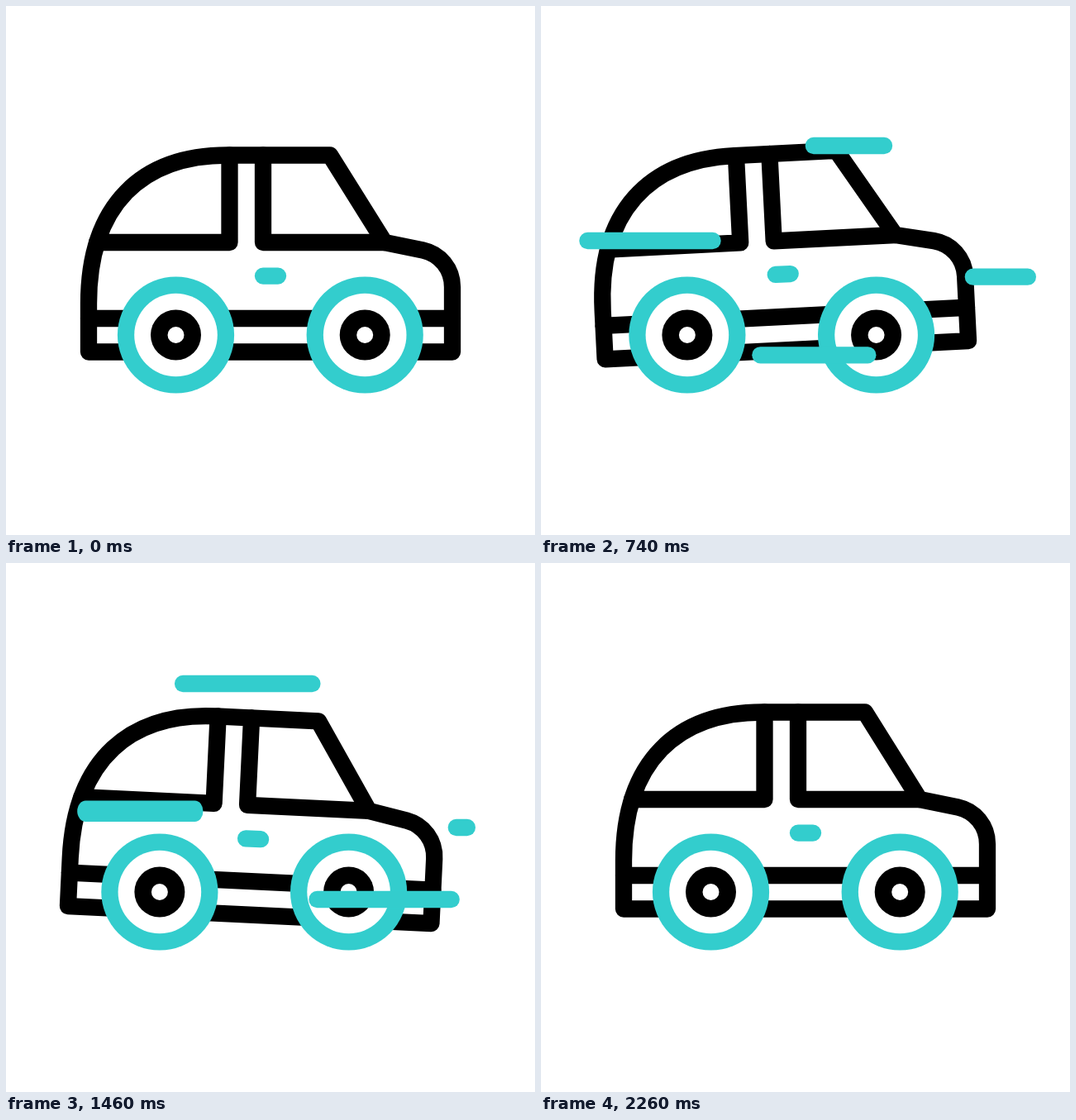
Recreate the animation shown at these times as an HTML page with a canvas. Size 640 by 640 pixels, loop 2420 ms.

```html
<!DOCTYPE html>
<html lang="en">
<head>
<meta charset="utf-8">
<title>Driving car</title>
<style>
  html, body { margin: 0; width: 100%; height: 100%; overflow: hidden; background: #fff; }
  canvas { display: block; width: 640px; height: 640px; }
</style>
</head>
<body>
<canvas id="stage" width="640" height="640"></canvas>
<script>
const ctx = document.getElementById('stage').getContext('2d');
const LOOP = 2420, STEP = 20, STROKE = 20.3;
const BLACK = '#000', TEAL = '#33cdcd', WHITE = '#fff';
const PIVOT = { x: 320, y: 300 };

// Keyframes as [ms, value], eased between neighbours
const SHIFT = [[0, 0], [585, -44.6], [1100, 32.5], [1640, -37], [2215, 0]];
const LIFT = [[0, 0], [480, 12.5], [950, -12.5], [1400, 8], [1850, -10], [2215, 0]];
const TILT = [[0, 0], [640, -3.05], [1580, 2.98], [2215, 0]];

// Speed lines: the head runs left, the tail follows after a delay
const LINE_LENGTH = 200, LINE_TIME = 444, TAIL_DELAY = 268;
const LINES = [
  { right: 540, y: 169, start: 229 },
  { right: 263.5, y: 284, start: 331 },
  { right: 405.5, y: 422.3, start: 475 },
  { right: 599, y: 327.7, start: 567 },
  { right: 571, y: 407, start: 1096 },
  { right: 386.5, y: 146, start: 1143 },
  { right: 238.5, y: 300.2, start: 1192, thick: 1.25 },
  { right: 568, y: 320, start: 1387 }
];

const ease = u => (1 - Math.cos(Math.PI * Math.min(1, Math.max(0, u)))) / 2;

function valueAt(keys, t) {
  const next = keys.findIndex(k => k[0] > t);
  if (next < 0) return keys[keys.length - 1][1];
  const [t0, a] = keys[next - 1], [t1, b] = keys[next];
  return a + (b - a) * ease((t - t0) / (t1 - t0));
}

const shell = new Path2D(`M100 418.5 V360 C100 240 165 180.5 268 180.5 H392
  L458 286 L504.5 295.5 C525 300 540 318 540 340 V418.5 Z`);
const trim = new Path2D(`M110 286 H270.5 V180.5 M311 180.5 V286 H458 M100 378 H540`);
const handle = new Path2D('M311 326.6 H329');

function stroke(path, color) {
  ctx.strokeStyle = color;
  ctx.stroke(path);
}

function drawBody(t) {
  ctx.save();
  ctx.translate(PIVOT.x + valueAt(SHIFT, t), PIVOT.y + valueAt(LIFT, t));
  ctx.rotate(valueAt(TILT, t) * Math.PI / 180);
  ctx.translate(-PIVOT.x, -PIVOT.y);
  stroke(shell, BLACK);
  stroke(trim, BLACK);
  stroke(handle, TEAL);
  ctx.restore();
}

function disc(x, y, r, color) {
  ctx.fillStyle = color;
  ctx.beginPath();
  ctx.arc(x, y, r, 0, 2 * Math.PI);
  ctx.fill();
}

function drawWheel(x) {
  disc(x, 398, 70.6, TEAL);
  disc(x, 398, 50.3, WHITE);
  disc(x, 398, 30.5, BLACK);
  disc(x, 398, 10, WHITE);
}

function drawLine({ right, y, start, thick = 1 }, t) {
  const head = ease((t - start) / LINE_TIME);
  const tail = ease((t - start - TAIL_DELAY) / LINE_TIME);
  if (head - tail < 0.001) return;
  const x = right - STROKE / 2;
  ctx.save();
  ctx.translate(x, y);
  ctx.scale(1, thick);
  ctx.strokeStyle = TEAL;
  ctx.beginPath();
  ctx.moveTo(-LINE_LENGTH * tail, 0);
  ctx.lineTo(-LINE_LENGTH * head, 0);
  ctx.stroke();
  ctx.restore();
}

function draw(t) {
  ctx.fillStyle = WHITE;
  ctx.fillRect(0, 0, 640, 640);
  ctx.lineWidth = STROKE;
  ctx.lineCap = ctx.lineJoin = 'round';
  drawBody(t);
  const shift = valueAt(SHIFT, t);
  drawWheel(205.5 + shift);
  drawWheel(434.2 + shift);
  LINES.forEach(line => drawLine(line, t));
}

const begin = performance.now();
function tick() {
  const t = (performance.now() - begin) % LOOP;
  draw(Math.floor(t / STEP) * STEP);
  requestAnimationFrame(tick);
}
tick();
</script>
</body>
</html>
```
